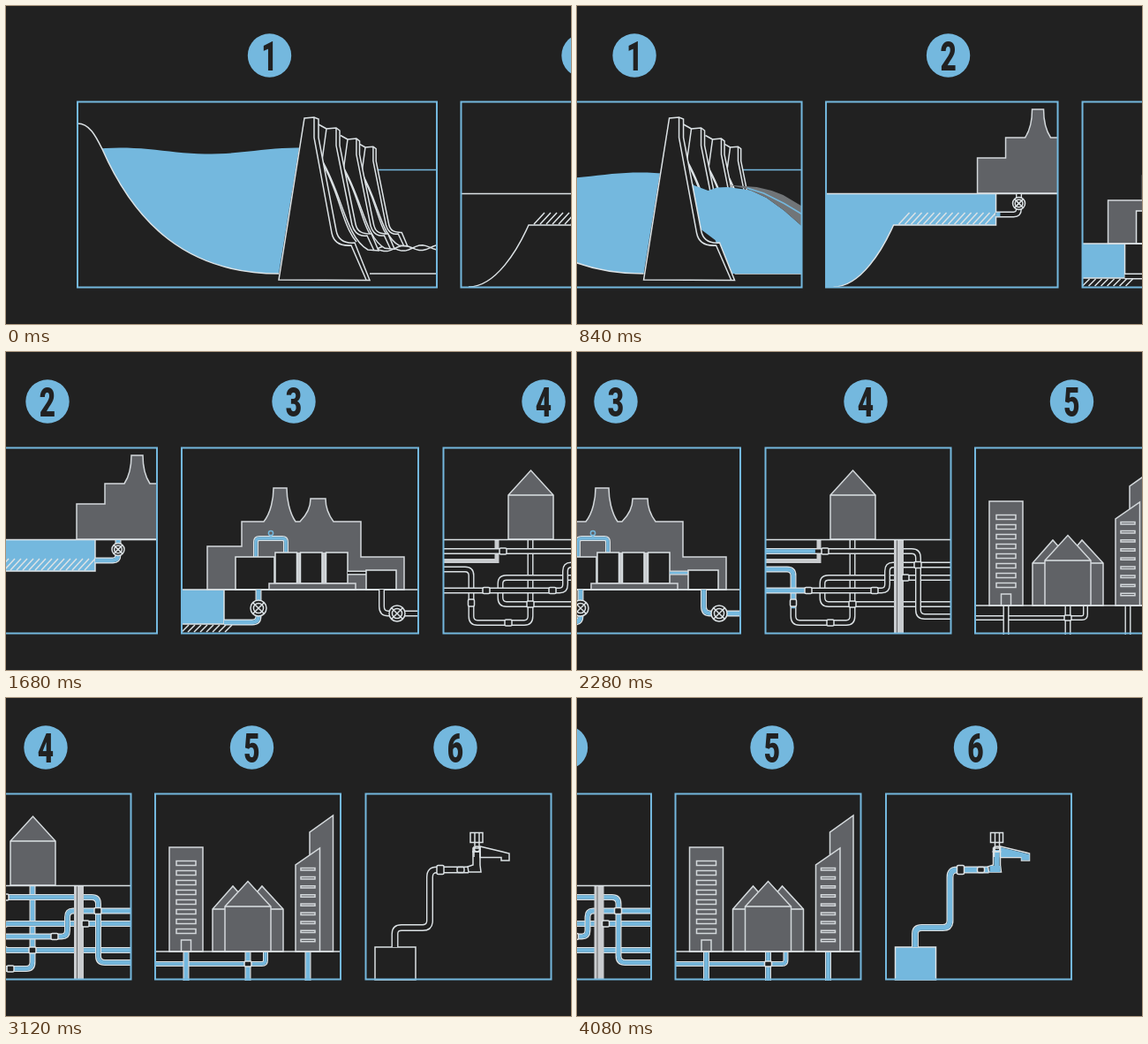
Animation of 640x360 px, one loop 4200 ms. Source, as an HTML page:

```html
<!DOCTYPE html>
<html lang="en">
<head>
<meta charset="utf-8">
<title>Water supply in six steps</title>
<style>
html, body { margin: 0; width: 100%; height: 100%; overflow: hidden; background: #212121; }
svg { display: block; width: 640px; height: 360px; }
path, circle, rect { vector-effect: non-scaling-stroke; }
.line { fill: none; stroke: #dce2e5; stroke-width: 1.5; }
.dark { fill: #212121; stroke: #dce2e5; stroke-width: 1.5; }
.gray { fill: #606266; stroke: #d3d8db; stroke-width: 1.5; }
.pale { fill: none; stroke: #c9cccf; }
.blue { fill: #74b8de; }
.foam { fill: #717578; }
.rill { fill: none; stroke: #74b8de; stroke-width: 1.5; }
.frame { fill: none; stroke: #74b8de; stroke-width: 2; }
.edge { fill: none; stroke: #dce2e5; }
.core { fill: none; stroke: #212121; }
.flow { fill: none; stroke: #74b8de; }
text { font: 900 46.5px Roboto, "Liberation Sans", sans-serif; text-anchor: middle; fill: #212121; }
</style>
</head>
<body>
<svg viewBox="0 0 640 360"><g id="strip"></g></svg>
<script>
const LOOP = 4200, STEP = 120;
const range = n => Array.from({ length: n }, (_, i) => i);
const shape = (cls, d, extra = '') => `<path class="${cls}" d="${d}" ${extra}/>`;
const box = (cls, x, y, w, h, extra = '') =>
  `<rect class="${cls}" x="${x}" y="${y}" width="${w}" height="${h}" ${extra}/>`;

// A pipe whose water runs along it between times a and b.
const pipe = (d, a, b, w = 7) =>
  shape('edge', d, `stroke-width="${w}"`) +
  shape('core', d, `stroke-width="${w - 2.8}"`) +
  shape('flow', d, `stroke-width="${w - 2.6}" pathLength="1" data-a="${a}" data-b="${b}"`);
// A shape that fills with water from below between times a and b.
const tank = (x, y, w, h, a, b) =>
  box('blue', x, y, w, h, `data-y="${y}" data-h="${h}" data-a="${a}" data-b="${b}"`);
const joint = (x, y, w = 8, h = 7) => box('dark', x - w / 2, y - h / 2, w, h, 'rx="1.5"');
const valve = (x, y, r) => {
  const k = r * 0.7;
  return `<circle class="dark" cx="${x}" cy="${y}" r="${r}"/>` +
    `<circle class="line" cx="${x}" cy="${y}" r="${r * 0.62}" stroke-width="1"/>` +
    shape('line', `M${x - k},${y - k}l${2 * k},${2 * k}m0,${-2 * k}l${-2 * k},${2 * k}`);
};
const hatch = (x, y, n, gap, w, h) =>
  shape('line', range(n).map(i => `M${x + i * gap},${y}l${w},${-h}`).join(''));

const panel = (n, dx, x0, x1, badge, body) => `<g transform="translate(${dx})">
  <clipPath id="clip${n}"><rect x="${x0}" y="108" width="${x1 - x0}" height="212"/></clipPath>
  <g clip-path="url(#clip${n})">${body}</g>
  ${box('frame', x0, 108.5, x1 - x0, 210)}
  <circle class="blue" cx="${badge}" cy="56" r="24.7"/>
  <text transform="translate(${badge} 73) scale(.68 1)">${n}</text></g>`;

// 1: reservoir and dam
const slope = 'M81,133C95,133 102,148 109,162C146,246 205,303 309,303';
const pier = (x, y, s) => `<g transform="translate(${x} ${y}) scale(${s})">` +
  shape('line', 'M-9,-5L0,0') +
  shape('dark', 'M-5,36L0,0L11,-1L15,2V19L33,108C35,117 41,119 51,119L59,138L47,137C22,123 18,75 -5,36Z') +
  shape('line', 'M11,0V19L29,109C32,119 39,122 46,121L54,138M-4,40C14,70 18,110 34,128') + '</g>';
const ripple = flip => 'M420,276' + range(18).map(i =>
  `L${420 + i * 4},${(275 - i * 0.1 + flip * 3 * Math.sin(i * 0.62)).toFixed(1)}`).join('');
const damScene =
  `<clipPath id="basin1"><path d="${slope}L337,130H81Z"/></clipPath>
   <clipPath id="spill"><rect id="reach" x="340" y="108" width="0" height="212"/></clipPath>` +
  '<g clip-path="url(#basin1)"><path id="lake" class="blue"/></g>' +
  shape('line', slope) +
  shape('rill', 'M420,185.5H488') + shape('line', 'M412,303H488') +
  shape('line', ripple(1)) + shape('line', ripple(-1)) +
  pier(407, 160, 0.81) + pier(387, 151, 0.9) + pier(363, 139, 1) +
  `<g clip-path="url(#spill)"><path id="river" class="blue"/>
   <path id="foam" class="foam"/><path id="rill" class="rill"/></g>` +
  shape('dark', 'M309,310L338,127L349,126L354,128V149L374,254C376,265 383,269 395,268L412,310.500Z') +
  shape('line', 'M349,127V149L369,257C371,267 378,272 391,271L408,310');

// 2: intake
const intakeScene =
  '<clipPath id="basin2"><path d="M516,212H708V248H592C580,275 555,318 524,318H516Z"/></clipPath>' +
  '<g clip-path="url(#basin2)"><path id="inflow" class="blue"/></g>' +
  shape('gray', 'M687,212V172H719V149H741C747,140 749,127 749,117H762C762,127 764,140 770,149H780V212Z') +
  shape('line', 'M516,212.500H778M524,318C555,318 580,275 592,248H708V212') +
  hatch(598, 247, 15, 7, 12, 13) +
  pipe('M708,236H728Q734,236 734,229V213', 800, 1180) + valve(734, 223.5, 7);

// 3: treatment works
const worksScene =
  box('blue', 199, 269, 48, 39) +
  shape('gray', 'M228,269V220H267V192H292C300,182 303,166 303,154H318C318,166 321,182 328,192H333' +
    'C341,184 345,174 345,166H362C362,174 365,184 371,192H402V232H451V269Z') +
  pipe('M283,233V215Q283,211 287,211H313Q317,211 317,215V228', 1380, 1680, 6) +
  '<circle class="rill" cx="300" cy="205" r="2.6"/>' + shape('rill', 'M300,207V211') +
  box('dark', 260, 232, 44, 37) +
  shape('pale', 'M331.500,227V262M360,227V262', 'stroke-width="4"') +
  [305, 333.5, 362.5].map(x => box('dark', x, 227, 24.5, 35)).join('') +
  box('gray', 298, 262, 98, 7) +
  pipe('M387,250H408', 1800, 2040, 5) + box('dark', 408, 247, 34, 22) +
  shape('line', 'M199,269H467M247,269V308H199M247,308H257') +
  hatch(199, 317, 8, 7, 8, 8) +
  pipe('M247,306H279Q286,306 286,299V269', 900, 1500) + valve(286, 290, 9) +
  pipe('M425.500,269V288Q425.500,296 433,296H468', 1980, 2240) + valve(443, 296, 9);

// 4: underground mains
const mainsScene =
  shape('gray', 'M287,212V162L312.500,134L338,162V212Z') + shape('line', 'M287,162H338') +
  shape('pale', 'M213,236.500H274V213', 'stroke-width="5"') +
  pipe('M213,246H238Q245,246 245,253V299Q245,306.500 252,306.500H305Q312,306.500 312,299V213', 2040, 2840) +
  pipe('M278,270V262Q278,255.500 285,255.500H424M278,268V278Q278,285.500 285,285.500H424', 2400, 3080) +
  pipe('M213,270H345Q351.500,270 351.500,263V248Q351.500,241 358,241H424', 2100, 3040) +
  pipe('M213,225.500H379Q386.500,225.500 386.500,233V292Q386.500,299.500 394,299.500H424', 2080, 3060) +
  box('', 359, 213, 11, 106, 'fill="#c9cccf"') +
  shape('core', 'M362.500,213V319', 'stroke-width=".6"') +
  [[281, 225.5], [262, 270], [337, 270], [386, 241], [372, 255.5], [312, 285.5], [287, 306.5]]
    .map(p => joint(...p)).join('') + joint(245, 284, 7, 8) +
  shape('line', 'M213,212.500H424');

// 5: town
const townScene =
  pipe('M169,301H290Q294,301 294,297V287', 2640, 3100, 6) +
  [204, 274, 342].map((x, i) => pipe(`M${x},287V320`, 2700 + i * 120, 2860 + i * 120)).join('') +
  joint(274, 301, 8, 6) +
  box('gray', 185, 169, 38, 118) +
  range(8).map(i => box('gray', 193, 184.5 + i * 11, 22, 5)).join('') +
  box('gray', 198.5, 274, 11, 13) +
  shape('gray', 'M234,287V239L257,213L280,239V287Z') +
  shape('gray', 'M268,287V239L290,213L314,239V287Z') +
  shape('line', 'M234,239H248M300,239H314') +
  shape('gray', 'M248,287V236L274,207.500L300,236V287Z') + shape('line', 'M248,236H300') +
  shape('gray', 'M344,287V152L370.500,133V287Z') +
  shape('gray', 'M328,287V189L355.500,170V287Z') +
  range(9).map(i => box('gray', 334, 192.5 + i * 10.1, 16, 2.4)).join('') +
  shape('line', 'M169,287H379');

// 6: tap
const tapScene =
  tank(418, 282, 46, 37, 3180, 3480) + box('line', 418, 282, 46, 37) +
  pipe('M440.500,282V267Q440.500,260 448,260H472Q480,260 480,252V203Q480,194.500 488,194.500H524', 3400, 3840, 8) +
  joint(492, 194.5, 8, 10) + joint(515, 194.5, 8, 6) +
  shape('dark', 'M523,191L529,189V170H537V189L538,197H524Z') +
  shape('dark', 'M537,168L562,174L570,176V184H561V180.500H537Z') +
  tank(525, 190, 12, 7, 3720, 3900) + tank(530, 172, 6, 18, 3840, 3960) +
  shape('blue', 'M537,169L562,175L570,177V183.500H561V180H537Z', 'data-show="3960"') +
  shape('line', 'M530,168V180M537,168V180M528,174H538') +
  box('dark', 526, 152.5, 14, 11) + shape('line', 'M531,153V168M536,153V168') +
  '<circle class="line" cx="533.5" cy="171" r="3"/>';

const strip = document.getElementById('strip');
strip.innerHTML =
  panel(1, 0, 81, 488, 298.5, damScene) +
  panel(2, 0, 515.5, 778, 654, intakeScene) +
  panel(3, 607, 199, 467, 326, worksScene) +
  panel(4, 889, 213.5, 423.5, 327, mainsScene) +
  panel(5, 1171, 169, 379, 278.5, townScene) +
  panel(6, 1171, 407.5, 617.5, 509, tapScene);

const el = id => document.getElementById(id);
const flows = [...strip.querySelectorAll('.flow')];
const tanks = [...strip.querySelectorAll('[data-y]')];
const shows = [...strip.querySelectorAll('[data-show]')];

const mix = (a, b, k) => a + (b - a) * k;
const part = (t, a, b) => Math.min(1, Math.max(0, (t - a) / (b - a)));
const track = (t, keys) => {
  const i = Math.max(1, keys.findIndex(k => k[0] >= t));
  const [a, b] = t > keys.at(-1)[0] ? keys.slice(-2) : [keys[i - 1], keys[i]];
  return mix(a[1], b[1], part(t, a[0], b[0]));
};

// Camera keys: time, place, speed
const camera = [[0, 0, .17], [480, 107, .29], [1200, 386, .435], [1680, 607, .475],
  [2280, 889, .44], [3120, 1171, .235], [3600, 1227.5, .01], [4080, 1228.5, 0], [4200, 1228.5, 0]];
function pan(t) {
  const i = camera.findIndex(k => k[0] > t);
  const [ta, a, va] = camera[i - 1], [tb, b, vb] = camera[i];
  const d = tb - ta, s = (t - ta) / d, s2 = s * s, s3 = s2 * s;
  return a * (2 * s3 - 3 * s2 + 1) + b * (3 * s2 - 2 * s3) +
    d * (va * (s3 - 2 * s2 + s) + vb * (s3 - s2));
}

// Spill outlines: x, high y, low y
const river = [[356, 178, 205], [366, 184, 222], [382, 192, 226], [392, 190, 221], [404, 188, 222],
  [430, 191, 226], [448, 200, 234], [468, 215, 248], [488, 238, 260]];
const foam = [[404, 183, 222], [437, 184, 226], [454, 187, 231], [467, 192, 236], [488, 208, 245],
  [488, 238, 260], [468, 215, 248], [448, 200, 234], [426, 190, 224]];
const rill = [[426, 188, 224], [445, 193, 231], [468, 205, 242], [488, 219, 252]];
const poly = (pts, k) => 'M' + pts.map(([x, a, b]) => `${x},${mix(a, b, k)}`).join('L');

function draw(t) {
  strip.setAttribute('transform', `translate(${-pan(t)})`);

  const level = 164 + 16 * t / 480;
  el('lake').setAttribute('d', 'M' + range(34).map(i => {
    const x = 81 + i * 8;
    return `${x},${level - 3.5 * Math.cos((x - 130) / 100 * Math.PI - Math.PI * t / 480)}`;
  }).join('L') + 'V320H81Z');

  const fall = part(t, 480, 1200);
  el('reach').setAttribute('width', 150 * part(t, 0, 420));
  el('river').setAttribute('d', poly(river, fall) + 'V303H405L390,265L370,250Z');
  el('foam').setAttribute('d', poly(foam, fall) + 'Z');
  el('rill').setAttribute('d', poly(rill, fall));

  const near = track(t, [[120, 330], [480, 230], [780, 213]]);
  const far = track(t, [[240, 330], [480, 260], [840, 213]]);
  el('inflow').setAttribute('d',
    `M515,${near}Q548,${(near + far) / 2 + (far - near) * 0.35} 590,${far}H710V320H515Z`);

  for (const f of flows)
    f.setAttribute('stroke-dasharray', `${part(t, +f.dataset.a, +f.dataset.b)} 2`);
  for (const k of tanks) {
    const { y, h, a, b } = k.dataset, p = h * part(t, +a, +b);
    k.setAttribute('y', +y + +h - p);
    k.setAttribute('height', p);
  }
  for (const s of shows) s.style.visibility = t >= +s.dataset.show ? 'visible' : 'hidden';
}

const start = performance.now();
function tick() {
  const t = (performance.now() - start) % LOOP;
  draw(Math.floor(t / STEP) * STEP);
  requestAnimationFrame(tick);
}
tick();
</script>
</body>
</html>
```
